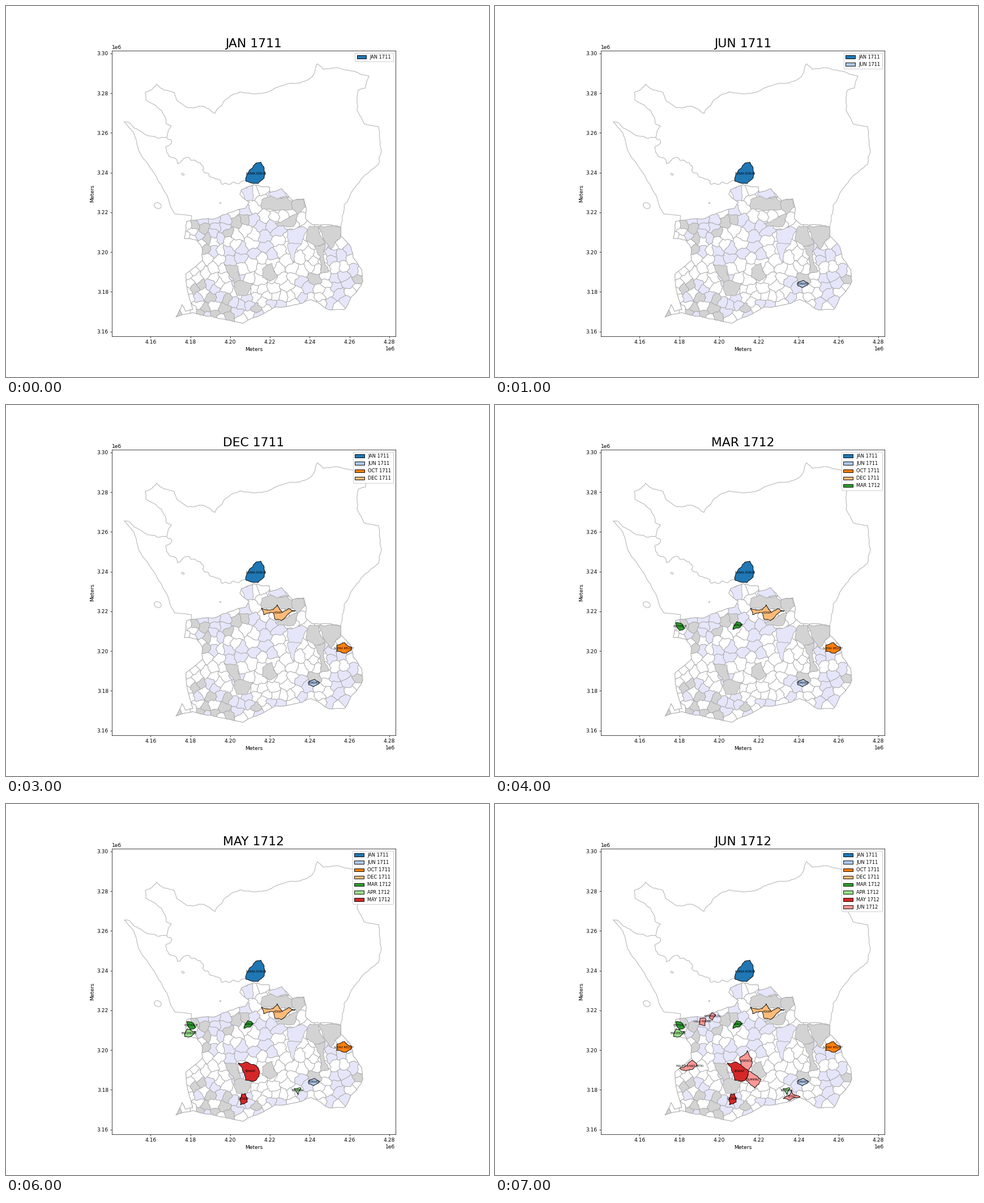
Write a matplotlib script that moves like this. It is 853x656 px and loops after 8 s.

```python
import numpy as np
import matplotlib.pyplot as plt
from matplotlib.animation import FuncAnimation
from matplotlib.patches import Ellipse, Patch, Polygon
from matplotlib.path import Path
from matplotlib.transforms import Affine2D

W, H, DPI = 853, 656, 64
PT = 65.6 / DPI
EDGE, GREY, LAV = "darkgray", "lightgray", "lavender"
rng = np.random.RandomState(7)

plt.rcParams.update({
    "font.family": "DejaVu Sans", "font.size": 10 * PT,
    "axes.linewidth": 0.8 * PT, "patch.linewidth": PT,
    "xtick.major.size": 3.5 * PT, "ytick.major.size": 3.5 * PT,
    "xtick.major.width": 0.8 * PT, "ytick.major.width": 0.8 * PT,
})

# Coasts and borders, pixels with y down
KULLEN = [(209, 205), (219, 207), (255, 230), (284, 232), (292, 212), (283, 208),
          (275, 185), (247, 166), (246, 153), (266, 138), (297, 153), (302, 167),
          (322, 180), (358, 182), (369, 190), (386, 167), (413, 152)]
NORTH = [(413, 152), (428, 154), (463, 152), (511, 137), (540, 126), (550, 102),
         (560, 112), (583, 109), (641, 124), (635, 145), (622, 149), (620, 185),
         (632, 208), (658, 213), (663, 255), (658, 280), (614, 323), (597, 353),
         (591, 391)]
INNER = [(284, 233), (292, 243), (282, 250), (296, 268), (303, 279), (316, 269),
         (343, 277), (347, 290), (363, 303), (402, 311), (424, 309)]
SOUND = [(209, 205), (226, 225), (234, 255), (265, 301), (299, 368), (328, 371),
         (327, 381)]
TOP = [(319, 381), (366, 377), (401, 364), (424, 357), (430, 347), (413, 333),
       (416, 325), (438, 316), (465, 320), (466, 330), (487, 323), (506, 344),
       (526, 341), (530, 357), (529, 376), (541, 387), (591, 391)]
EAST = [(591, 407), (609, 426), (613, 445), (628, 466), (630, 487), (610, 514),
        (597, 537)]
SOUTH = [(570, 537), (538, 519), (475, 532), (418, 561), (375, 552), (330, 542),
         (300, 550)]
WEST = [(311, 528), (317, 540), (330, 537), (320, 500), (318, 474), (347, 450),
        (347, 430), (337, 414), (315, 411)]

# Large parishes
BIG_GREY = [
    [(452, 342), (468, 336), (497, 338), (506, 347), (505, 360), (475, 362), (452, 359)],
    [(506, 339), (526, 343), (529, 355), (515, 369), (507, 360)],
    [(475, 384), (515, 368), (508, 390), (480, 390)],
    [(537, 389), (552, 390), (564, 418), (545, 425), (530, 414)],
    [(552, 390), (591, 391), (591, 410), (574, 431), (564, 418)],
    [(385, 457), (410, 460), (414, 485), (403, 490)],
    [(414, 485), (436, 490), (425, 512), (408, 512), (403, 490)],
    [(453, 465), (470, 455), (480, 478), (466, 487), (453, 480)],
    [(545, 425), (564, 420), (570, 470), (556, 473), (555, 443)],
]
BIG_LAV = [
    [(463, 334), (472, 323), (487, 323), (496, 337), (480, 342)],
    [(414, 326), (436, 317), (436, 345), (424, 345)],
    [(497, 396), (524, 390), (533, 396), (522, 420), (500, 420)],
    [(497, 421), (522, 421), (507, 454)],
]

# Mostly lavender zones: centre and radii
ZONES = [(378, 393, 32, 22), (437, 383, 13, 24), (415, 430, 58, 25), (474, 392, 28, 20),
         (360, 503, 26, 28), (425, 526, 62, 18), (592, 468, 28, 42), (530, 495, 7, 22),
         (348, 408, 10, 10)]
GREY_SPOTS = [(335, 388), (349, 393), (355, 411), (354, 430), (408, 381), (421, 377),
              (392, 402), (346, 494), (333, 500), (362, 514), (352, 535), (343, 542),
              (368, 546), (390, 519), (386, 535), (394, 549), (440, 535), (305, 546),
              (623, 485), (546, 482)]


def rough(pts, bend=0.1, closed=False):
    """Break lines up by repeated midpoint displacement."""
    pts = np.array(pts, float)
    if closed:
        pts = np.vstack([pts, pts[:1]])

    def split(a, b):
        d = b - a
        if np.hypot(*d) < 4:
            return [a]
        mid = (a + b) / 2 + np.array([-d[1], d[0]]) * rng.uniform(-bend, bend)
        return split(a, mid) + split(mid, b)

    out = [p for a, b in zip(pts, pts[1:]) for p in split(a, b)]
    return np.array(out if closed else out + [pts[-1]])


def warp(p):
    x, y = p.T
    return np.column_stack([x + 1.4 * np.sin(0.42 * y + 0.2 * x) + 0.6 * np.sin(1.1 * y),
                            y + 1.4 * np.sin(0.38 * x - 0.17 * y) + 0.6 * np.sin(1.2 * x)])


def clip_half(poly, mid, normal):
    """Keep the part of poly behind the line through mid."""
    out = []
    for i, b in enumerate(poly):
        a = poly[i - 1]
        da, db = np.dot(a - mid, normal), np.dot(b - mid, normal)
        if da * db < 0:
            out.append(a + (b - a) * da / (da - db))
        if db <= 0:
            out.append(b)
    return out


def cell(seeds, c):
    """Voronoi cell around seed c with wavy edges."""
    poly = [c + 60 * np.array(s) for s in ((-1, -1), (1, -1), (1, 1), (-1, 1))]
    near = np.argsort(np.hypot(*(seeds - c).T))[1:26]
    for q in seeds[near]:
        poly = clip_half(poly, (c + q) / 2, q - c)
    t = np.linspace(0, 1, 5)[:-1, None]
    return warp(np.vstack([a + (b - a) * t for a, b in zip(poly, poly[1:] + poly[:1])]))


def fill_seeds(fixed, area):
    """Fill the gaps between the fixed centres with random ones."""
    seeds = [np.array(p, float) for p in fixed]
    cand = rng.uniform((300, 312), (632, 562), (6000, 2))
    for p in cand[area.contains_points(cand)]:
        gap = 15 if 395 < p[0] < 540 and p[1] < 500 else 12
        if np.hypot(*(np.array(seeds) - p).T).min() > gap:
            seeds.append(p)
    return np.array(seeds)


def cell_color(x, y):
    inside = any(np.hypot((x - u) / a, (y - v) / b) < 1 for u, v, a, b in ZONES)
    return LAV if rng.rand() < (0.82 if inside else 0.08) else "white"


def centroid(p):
    x, y = p.T
    u, v = np.roll(p, -1, axis=0).T
    cross = x * v - u * y
    return (((x + u) * cross).sum() / cross.sum() / 3,
            ((y + v) * cross).sum() / cross.sum() / 3)


fig = plt.figure(figsize=(W / DPI, H / DPI), dpi=DPI, facecolor="white")
L, R, T, B = 187.3, 687.7, 78.7, 583.8
ax = fig.add_axes([L / W, 1 - B / H, (R - L) / W, (B - T) / H])
K = 3514e-6  # pixels per metre
ax.set_xlim(4.16e6 + (L - 255.3) / K, 4.16e6 + (R - 255.3) / K)
ax.set_ylim(3.16e6 + (575.7 - B) / K, 3.16e6 + (575.7 - T) / K)
ax.set_xlabel("Meters")
ax.set_ylabel("Meters")
PX = Affine2D().scale(1 / W, -1 / H).translate(0, 1) + fig.transFigure


def shape(pts, face, edge=EDGE, z=1, clip=None):
    p = Polygon(pts, closed=True, fc=face, ec=edge, lw=PT, transform=PX, zorder=z)
    ax.add_artist(p)
    if clip is not None:
        p.set_clip_path(clip)
    return p


for line, bend in ((KULLEN, 0.12), (NORTH, 0.07), (INNER, 0.25), (SOUND, 0.05)):
    ax.add_line(plt.Line2D(*rough(line, bend).T, color=EDGE, lw=PT, transform=PX, zorder=1))
for x, y, w, h in ((268, 353, 13, 10), (312.5, 297.5, 5, 3), (378.5, 348.5, 2, 2)):
    ax.add_artist(Ellipse((x, y), w, h, angle=25, fc="white", ec=EDGE, lw=PT, transform=PX))

border = rough(TOP + EAST + SOUTH + WEST, 0.06, True)
area = shape(border, "white")
seeds = fill_seeds(GREY_SPOTS, Path(border))
for i, c in enumerate(seeds):
    face = GREY if i < len(GREY_SPOTS) else cell_color(*c)
    shape(cell(seeds, c), face, z=2, clip=area)
for face, group in ((GREY, BIG_GREY), (LAV, BIG_LAV)):
    for pts in group:
        shape(rough(pts, 0.12, True), face, z=3, clip=area)
shape(border, "none", z=4)

MONTHS = ["JAN 1711", "JUN 1711", "OCT 1711", "DEC 1711",
          "MAR 1712", "APR 1712", "MAY 1712", "JUN 1712"]
COLORS = [plt.cm.tab20(i) for i in range(len(MONTHS))]
layers = [[] for _ in MONTHS]


def parish(step, name, *pts):
    outline = rough(pts, 0.13, True)
    layers[step] += [
        shape(outline, COLORS[step], "black", z=5),
        ax.text(*centroid(outline), name, fontsize=5 * PT, ha="center", va="center",
                transform=PX, zorder=6)]


parish(0, "NORRA RÖRUM", (441, 278), (450, 276), (456, 291), (456, 304), (445, 314),
       (434, 313), (424, 310), (429, 292))
parish(1, "TOMARP", (534, 490), (545, 485), (554, 491), (543, 498), (535, 495))
parish(2, "SÖDRA MELLBY", (584, 425), (598, 420), (610, 428), (609, 434), (597, 439),
       (584, 436))
parish(3, "HÖRBY", (451, 359), (472, 362), (479, 353), (488, 367), (499, 360),
       (511, 364), (486, 381), (475, 379), (472, 367), (455, 371))
parish(4, "HOFTERUP", (319, 385), (330, 387), (335, 395), (326, 399))
parish(4, "HURVA", (427, 383), (437, 388), (432, 394), (420, 397))
parish(5, "BARSEBÄCK", (320, 398), (335, 402), (327, 411), (316, 411))
parish(5, "BROMMA", (509, 503), (521, 502), (516, 514))
parish(6, "GENARP", (410, 458), (441, 462), (448, 474), (442, 488), (423, 488), (418, 472))
parish(6, "GRÖNBY", (416, 513), (423, 512), (426, 527), (414, 532))
parish(7, "REMMARLÖV", (383, 369), (390, 373), (384, 382), (379, 378))
parish(7, "LILLA HARRIE", (362, 379), (372, 379), (371, 392), (361, 390))
parish(7, "MALMÖ SANKT PETRI", (326, 467), (348, 453), (357, 462), (337, 472))
parish(7, "VEBERÖD", (432, 449), (446, 436), (454, 450), (447, 471), (434, 461))
parish(7, "RUMMING", (443, 488), (449, 472), (470, 487), (459, 503))
parish(7, "YSTAD", (509, 521), (521, 514), (523, 506), (526, 513), (539, 518), (521, 524))

handles = [Patch(facecolor=c, edgecolor="black", label=m) for m, c in zip(MONTHS, COLORS)]


def update(i):
    ax.set_title(MONTHS[i], fontsize=24 * PT)
    for k, layer in enumerate(layers):
        for item in layer:
            item.set_visible(k <= i)
    legend = ax.legend(handles=handles[:i + 1], loc="upper right",
                       fontsize=9 * PT, framealpha=1)
    legend.set_zorder(10)
    return []


anim = FuncAnimation(fig, update, frames=len(MONTHS), interval=1000,
                     repeat=True, repeat_delay=0, blit=False)
plt.show()
```
